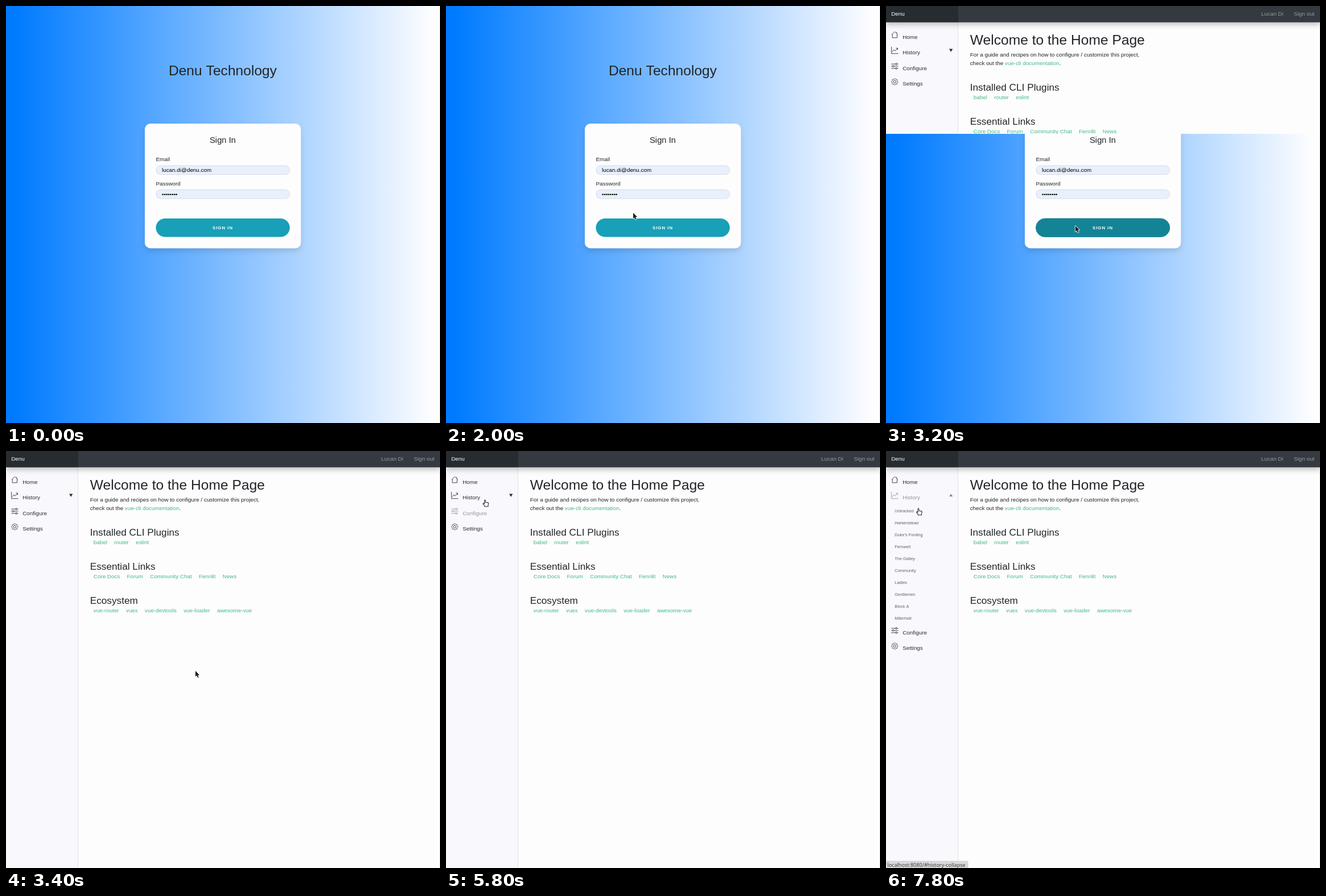
Recreate the animation shown at these times as an HTML page with a canvas. Size 763 by 734 pixels, loop 8000 ms.

```html
<!DOCTYPE html>
<html lang="en">
<head>
<meta charset="utf-8">
<title>Sign in and browse</title>
<style>
html, body { margin: 0; width: 100%; height: 100%; overflow: hidden; background: #fff; }
canvas { display: block; width: 763px; height: 734px; }
</style>
</head>
<body>
<canvas id="stage" width="763" height="734"></canvas>
<script>
const W = 763, H = 734, LOOP = 8000, STEP = 200;
const ctx = document.getElementById('stage').getContext('2d');
const SANS = '"Liberation Sans", Arial, sans-serif';
const REM = 9.85;
const INK = '#212529', GREEN = '#42b983', MUTED = '#97979b', PAGE = '#fefdfe';

const ROOMS = ['Untracked', 'Harkenstead', "Duke's Fording", 'Fernwell', 'The Galley',
  'Community', 'Ladies', 'Gentlemen', 'Block A', 'Millerholt'];
const ROW = 21;

// Pointer path: time, x, y of the tip
const PATH = [
  [200, 734, 330], [600, 500, 285], [1200, 308, 240], [1400, 308, 240],
  [2200, 333, 387], [3600, 333, 387], [4000, 330, 350], [4800, 320, 219],
  [5200, 130, 135], [5400, 84, 112], [5800, 68.5, 86], [6800, 68, 86],
  [7400, 62, 92], [7800, 57, 101], [8000, 57, 101]
];

const clamp = v => Math.max(0, Math.min(1, v));
const smooth = v => v * v * (3 - 2 * v);

function text(str, x, y, size = REM, color = INK, align = 'left', weight = '') {
  ctx.font = `${weight} ${size}px ${SANS}`;
  ctx.fillStyle = color;
  ctx.textAlign = align;
  ctx.fillText(str, x, y);
  return ctx.measureText(str).width;
}

function box(x, y, w, h, r, fill, stroke) {
  ctx.beginPath();
  ctx.roundRect(x, y, w, h, r);
  ctx.fillStyle = fill;
  ctx.fill();
  if (stroke) {
    ctx.strokeStyle = stroke;
    ctx.lineWidth = 0.8;
    ctx.stroke();
  }
}

function withShadow(alpha, dy, blur, draw) {
  ctx.save();
  ctx.shadowColor = `rgba(0,0,0,${alpha})`;
  ctx.shadowOffsetY = dy;
  ctx.shadowBlur = blur;
  draw();
  ctx.restore();
}

function rightEdge() {
  ctx.fillStyle = '#e4e6ee';
  ctx.fillRect(W - 1, 0, 1, H);
}

function login(hover) {
  const sky = ctx.createLinearGradient(0, 0, W, 0);
  sky.addColorStop(0, '#007bff');
  sky.addColorStop(0.02, '#007bff');
  sky.addColorStop(0.98, '#fdfdff');
  sky.addColorStop(1, '#ffffff');
  ctx.fillStyle = sky;
  ctx.fillRect(0, 0, W, H);
  rightEdge();

  text('Denu Technology', 381, 122, REM * 2.5, INK, 'center');
  withShadow(0.12, 5, 10, () => box(244, 207, 274.5, 219.5, 9.85, PAGE));
  text('Sign In', 381, 240.5, REM * 1.5, INK, 'center');

  text('Email', 263.5, 273.2);
  box(263.9, 281, 234.8, 15.6, 7.8, '#e8f0fe', '#ced4da');
  text('lucan.di@denu.com', 274, 291.7, REM, '#000');

  text('Password', 263.5, 316);
  box(263.9, 323.5, 234.8, 15.6, 7.8, '#e8f0fe', '#ced4da');
  text('••••••••', 274, 334.6, REM, '#000');

  box(263.5, 374, 235.4, 32.5, 16.25, hover ? '#138496' : '#17a0b7', hover ? '#117a8b' : null);
  ctx.letterSpacing = '0.985px';
  text('SIGN IN', 381, 393.1, REM * 0.8, '#fff', 'center', 'bold');
  ctx.letterSpacing = '0px';
}

const icons = {
  Home() {
    ctx.moveTo(1, 8); ctx.lineTo(8, 1); ctx.lineTo(15, 8);
    ctx.moveTo(2.6, 6.8); ctx.lineTo(2.6, 15); ctx.lineTo(13.4, 15); ctx.lineTo(13.4, 6.8);
    ctx.moveTo(12.6, 5); ctx.lineTo(12.6, 2.2);
  },
  History() {
    ctx.moveTo(0.6, 0); ctx.lineTo(0.6, 15.4); ctx.lineTo(16, 15.4);
    ctx.moveTo(2.5, 11.5); ctx.lineTo(6, 6.5); ctx.lineTo(9, 9.5); ctx.lineTo(14.4, 3.4);
    ctx.moveTo(10.5, 3); ctx.lineTo(14.6, 3); ctx.lineTo(14.6, 7);
  },
  Configure() {
    [[3, 11.5], [8, 4.5], [13, 11.5]].forEach(([y, x]) => {
      ctx.moveTo(0, y); ctx.lineTo(x - 1.8, y);
      ctx.moveTo(x + 1.8, y); ctx.lineTo(16, y);
      ctx.moveTo(x + 1.8, y); ctx.arc(x, y, 1.8, 0, 7);
    });
  },
  Settings() {
    for (let i = 0; i <= 64; i++) {
      const a = i / 64 * Math.PI * 2, r = 6.6 + 0.85 * Math.cos(a * 8);
      ctx.lineTo(8 + r * Math.cos(a), 8 + r * Math.sin(a));
    }
    ctx.moveTo(10.9, 8); ctx.arc(8, 8, 2.9, 0, 7);
  }
};

function menuItem(name, y, muted) {
  const color = muted ? MUTED : '#2b2f33';
  ctx.save();
  ctx.translate(9.2, y - 13.2);
  ctx.scale(0.77, 0.77);
  ctx.strokeStyle = color;
  ctx.lineWidth = 1.15;
  ctx.beginPath();
  icons[name]();
  ctx.stroke();
  ctx.restore();
  text(name, 29.2, y, REM, color);
}

function caret(open, color) {
  const base = open ? 80 : 75.6, tip = open ? 75.6 : 80.8;
  ctx.beginPath();
  ctx.moveTo(111, base);
  ctx.lineTo(117.4, base);
  ctx.lineTo(114.2, tip);
  ctx.fillStyle = color;
  ctx.fill();
}

function sidebar(t) {
  const open = smooth(clamp((t - 6250) / 350)) * ROW * ROOMS.length;
  const onHistory = t >= 6000, onConfigure = t >= 5400 && t < 6000;
  ctx.fillStyle = '#f9f8fc';
  ctx.fillRect(0, 0, 127, H);
  ctx.fillStyle = '#e1e1e5';
  ctx.fillRect(126, 0, 1, H);

  menuItem('Home', 57.5);
  menuItem('History', 85.1, onHistory);
  caret(t >= 6400, onHistory ? '#8a8a8e' : '#2b2f33');
  if (open > 0) {
    ctx.save();
    ctx.beginPath();
    ctx.rect(0, 94, 126, open);
    ctx.clip();
    ROOMS.forEach((room, i) => text(room, 15.3, 107.6 + i * ROW, REM * 0.75, '#606367'));
    ctx.restore();
  }
  menuItem('Configure', 113 + open, onConfigure);
  menuItem('Settings', 140.4 + open);
}

function section(title, links, y) {
  text(title, 147.7, y, REM * 1.75);
  let x = 153.8;
  links.forEach(link => { x += text(link, x, y + 15, REM, GREEN) + 12.3; });
}

function home(t) {
  ctx.fillStyle = PAGE;
  ctx.fillRect(0, 0, W, H);
  sidebar(t);
  rightEdge();

  withShadow(0.25, 4, 10, () => {
    ctx.fillStyle = '#343a40';
    ctx.fillRect(0, 0, W, 28.7);
  });
  ctx.fillStyle = 'rgba(0,0,0,.25)';
  ctx.fillRect(0, 0, 127, 28.7);
  text('Denu', 9.2, 17.4, REM, '#fff');
  text('Lucan Di', 698.4, 17.4, REM, '#999c9f', 'right');
  text('Sign out', 753.2, 17.4, REM, '#999c9f', 'right');

  text('Welcome to the Home Page', 147.7, 67.6, REM * 2.5);
  text('For a guide and recipes on how to configure / customize this project,', 147.7, 89);
  let x = 147.7 + text('check out the ', 147.7, 103.9);
  x += text('vue-cli documentation', x, 103.9, REM, GREEN);
  text('.', x, 103.9);

  section('Installed CLI Plugins', ['babel', 'router', 'eslint'], 149);
  section('Essential Links', ['Core Docs', 'Forum', 'Community Chat', 'Fennlit', 'News'], 209);
  section('Ecosystem', ['vue-router', 'vuex', 'vue-devtools', 'vue-loader', 'awesome-vue'], 269);

  if (t >= 6200) statusBar();
}

function statusBar() {
  box(-1, 722, 145, 13, [0, 2, 0, 0], '#d9d9dc', '#c4c4c8');
  ctx.font = '9.05px "Noto Sans", "Open Sans", sans-serif';
  ctx.fillStyle = '#3c3c40';
  ctx.textAlign = 'left';
  ctx.fillText('localhost:8080/#history-collapse', 2.3, 731.5);
}

const ARROW = new Path2D('M0 0V10.2L2.3 8.1L4 12L5.8 11.2L4.1 7.5H7.2Z');
const HAND = new Path2D('M-.9 6.2V1Q-.9 0 0 0T.9 1V4.2L5 4.9Q6.4 5.2 6.3 6.6L5.5 9.6V11.7H-.6V10.3L-3.3 7.3Q-3.8 6.3-2.8 5.9Q-2 5.8-.9 7Z');

function pointer(t) {
  if (t < PATH[0][0]) return;
  const i = Math.max(1, PATH.findIndex(p => p[0] > t));
  const [t0, x0, y0] = PATH[i - 1], [t1, x1, y1] = PATH[i];
  const k = smooth((t - t0) / (t1 - t0));
  const hand = t >= 5400;
  ctx.save();
  ctx.translate(x0 + (x1 - x0) * k, y0 + (y1 - y0) * k);
  ctx.lineJoin = 'round';
  if (hand) {
    ctx.fillStyle = '#fff';
    ctx.strokeStyle = '#2c2c30';
    ctx.lineWidth = 1.1;
    ctx.fill(HAND);
    ctx.stroke(HAND);
  } else {
    ctx.strokeStyle = '#fff';
    ctx.lineWidth = 1.6;
    ctx.stroke(ARROW);
    ctx.fillStyle = '#1c1c20';
    ctx.fill(ARROW);
  }
  ctx.restore();
}

function draw(t) {
  if (t < 3400) {
    login(t >= 2200);
    pointer(t);
    if (t >= 3200) {
      // The new page first paints only its upper strip
      ctx.save();
      ctx.beginPath();
      ctx.rect(0, 0, W, 225);
      ctx.clip();
      home(t);
      ctx.restore();
    }
  } else {
    home(t);
    pointer(t);
  }
}

function tick() {
  const t = performance.now() % LOOP;
  draw(Math.floor(t / STEP) * STEP);
  requestAnimationFrame(tick);
}
tick();
</script>
</body>
</html>
```
